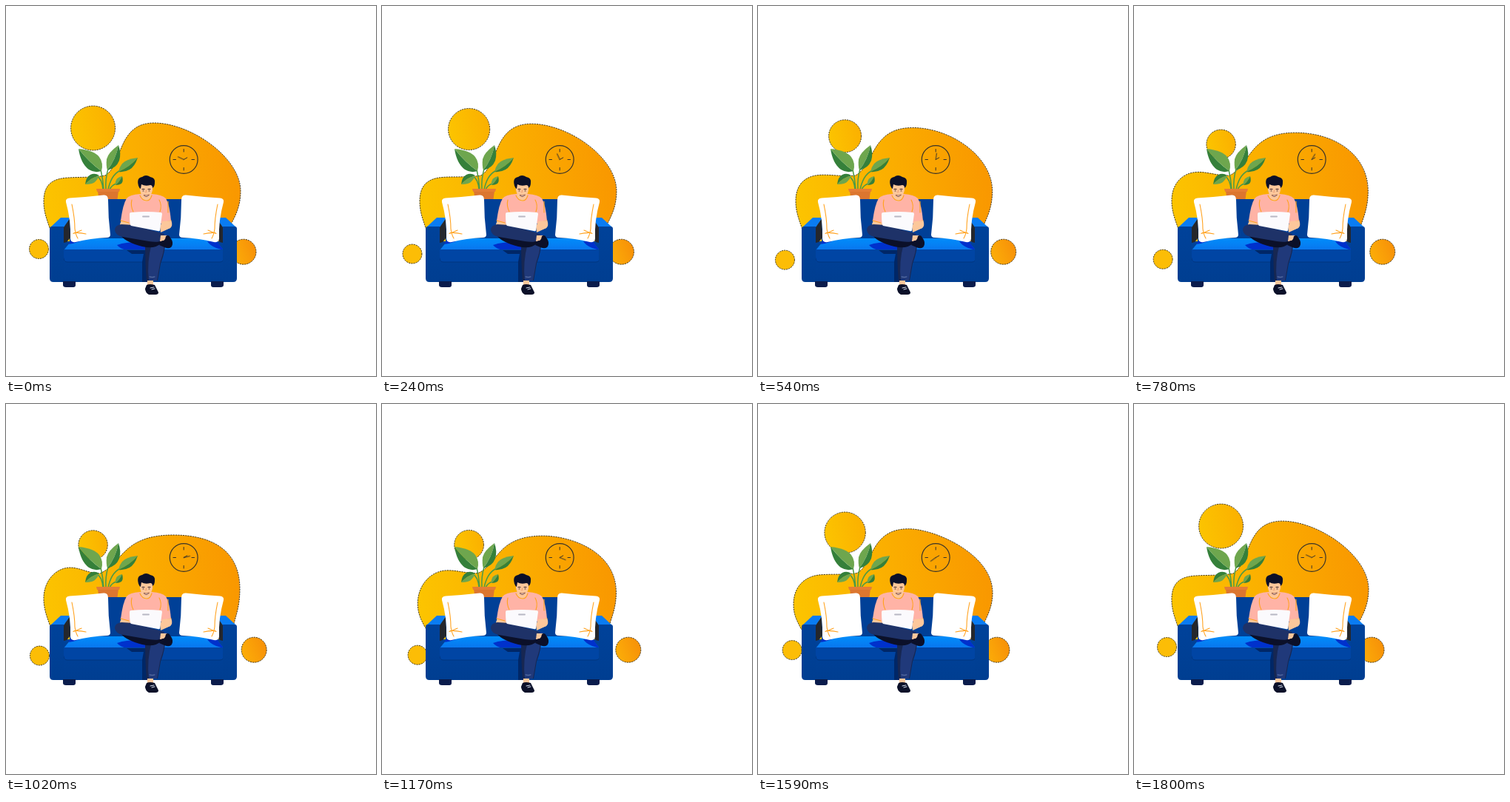
An HTML page that plays this animation: 500x500 px, repeating every 1830 ms.

```html
<!DOCTYPE html>
<html lang="en">
<head>
<meta charset="utf-8">
<title>Working from the sofa</title>
<style>
  html, body { margin: 0; width: 100%; height: 100%; overflow: hidden; background: #fff; }
  svg { display: block; width: 100vw; height: 100vh; }
  .rim { stroke: #1d180a; stroke-width: .8; stroke-dasharray: 2.2 1.1; }
  .line { fill: none; stroke-linecap: round; stroke-linejoin: round; }
  .clock { stroke: #37322a; stroke-width: 1.2; }
  .seam { stroke: #ffa21f; stroke-width: 1.1; }
  .stem { stroke: #4d9a45; stroke-width: 1.5; }
  .dark { fill: #35803a; }
  .light { fill: #6ea64e; }
  .skin { fill: #fcc79b; }
  .ink { fill: #0b1029; }

  .blob, .sun, .left-ball, .right-ball, .hand { animation: 1830ms infinite; }
  .blob { animation-name: morph; }
  .sun { animation-name: drop, shrink; animation-duration: 1830ms; }
  .left-ball { animation-name: orbit; }
  .right-ball { animation-name: slide; animation-timing-function: ease-in-out; }
  .hand { animation-name: turn; transform-origin: 240.2px 207.5px; }

  @keyframes morph {
    0%, 100% {
      d: path("M60 303C56 290 51 280 51 264C51 240 64 233 84 232C100 231 120 232 134 229C158 215 150 158 200 158C250 158 317 205 317 250C317 272 309 285 303 297V320H70Z");
      animation-timing-function: cubic-bezier(.5, 0, .75, .8);
    }
    55.7% {
      d: path("M59 298C55 287 51 276 51 263C51 238 68 221 87 221C100 221 112 229 127 229C158 215 157 177 226 177C282 177 316 200 316 250C316 272 311 285 308 297V320H70Z");
      animation-timing-function: linear;
    }
    73.8% {
      d: path("M56 304C49 295 45 290 45 278C45 250 66 231 86 229.5C104 228 118 230 133 228C155 220 152 179.5 207 179.5C225 179.5 317 199 317 260C317 273 313 283 309 293V320H70Z");
      animation-timing-function: ease-in-out;
    }
  }
  @keyframes drop {
    0%, 100% { cy: 165px; animation-timing-function: cubic-bezier(.6, 0, .5, 1); }
    59% { cy: 190.6px; animation-timing-function: cubic-bezier(.7, 0, .6, 1); }
  }
  @keyframes shrink {
    0%, 100% { r: 30px; animation-timing-function: ease-in-out; }
    44%, 60% { r: 19.7px; animation-timing-function: ease-in-out; }
  }
  @keyframes orbit {
    0%, 100% { cx: 44.5px; cy: 328.5px; animation-timing-function: cubic-bezier(.3, 0, .6, 1); }
    31% { cx: 36.4px; cy: 343.2px; animation-timing-function: cubic-bezier(.35, 0, .6, 1); }
    70% { cx: 48.7px; cy: 339px; animation-timing-function: ease-in-out; }
  }
  @keyframes slide {
    0%, 100% { cx: 321px; }
    47% { cx: 336px; }
  }
  @keyframes turn {
    0% { transform: rotate(-65deg); animation-timing-function: cubic-bezier(.2, .4, .7, .8); }
    40% { transform: rotate(25deg); animation-timing-function: cubic-bezier(.4, .2, .8, .8); }
    98.4%, 100% { transform: rotate(295deg); }
  }
</style>
</head>
<body>
<svg viewBox="0 0 500 500">
  <defs>
    <linearGradient id="blobFill" gradientUnits="userSpaceOnUse" x1="50" y1="270" x2="317" y2="235">
      <stop offset="0" stop-color="#fcc400"/><stop offset=".5" stop-color="#fbae00"/><stop offset="1" stop-color="#f99700"/>
    </linearGradient>
    <linearGradient id="sunFill" x1="0" y1=".6" x2="1" y2=".4">
      <stop offset="0" stop-color="#fcc400"/><stop offset="1" stop-color="#fbb000"/>
    </linearGradient>
    <linearGradient id="ballFill" x1="0" y1=".7" x2="1" y2=".3">
      <stop offset="0" stop-color="#fcae08"/><stop offset="1" stop-color="#f79008"/>
    </linearGradient>
    <linearGradient id="seatFill" x1="0" y1="0" x2="0" y2="1">
      <stop offset="0" stop-color="#008cfa"/><stop offset="1" stop-color="#0a76ee"/>
    </linearGradient>
    <linearGradient id="bodyFill" x1="0" y1="0" x2="0" y2="1">
      <stop offset="0" stop-color="#00429a"/><stop offset="1" stop-color="#003e91"/>
    </linearGradient>
    <g id="pillow">
      <path fill="#fff" d="M86 259.500 Q110 258 132 255.500 Q138 255 138 262 Q138 286 141 309 Q141 313 136 313 Q114 314 94 319 Q87 320 87 314 Q88 290 81 265 Q80 260 86 259.500Z"/>
      <path class="line seam" d="M89 268 Q93 287 93 301 Q94 309 97 314 M91 307.500 Q98 305 102 303 M92 306.500 Q100 306 108 308"/>
    </g>
    <g id="arm">
      <path fill="#25272c" d="M78 298 L86 287 L87 313 L82 319 L78 320Z"/>
      <path fill="#0a7cf2" d="M60 299 L74 286 H87 L78 299Z"/>
      <path fill="url(#bodyFill)" d="M59 301 Q59 298 62 298 H78 V373 H64 Q59 373 59 368Z"/>
      <path fill="#0a1c4c" d="M77 372 H94 V377 Q94 380 91 380 H81 Q77 380 77 377Z"/>
    </g>
  </defs>

  <path class="blob rim" fill="url(#blobFill)"/>
  <circle class="sun rim" cx="117.600" fill="url(#sunFill)"/>
  <circle class="left-ball rim" r="13" fill="#fcbd06"/>
  <circle class="right-ball rim" cy="332.200" r="17" fill="url(#ballFill)"/>

  <g class="line clock">
    <circle cx="240.200" cy="207.500" r="18.900"/>
    <path stroke-width="1" d="M240.200 193.500 V197 M240.200 218.500 V222 M226 207.500 H229.500 M251 207.500 H254.500 M240.200 207.500 L244.800 204.900"/>
    <path class="hand" stroke-width="1" d="M240.200 207.500 V199"/>
  </g>

  <g id="plant">
    <path class="line stem" d="M128 221 Q131 234 132 248 M138 220 Q134 234 135 248 M153 223 Q142 229 138 248 M123 230 Q130 234 131 248 M149 240 Q143 242 140 248"/>
    <path class="dark" d="M98 193 Q101 213 112 221 Q120 226 129 223 Q113 212 98 193Z"/>
    <path class="light" d="M98 193 Q119 195 126 204 Q132 212 129 223 Q113 212 98 193Z"/>
    <path class="light" d="M152 188 Q138 198 136 207 Q135 216 137 222 Q149 206 152 188Z"/>
    <path class="dark" d="M152 188 Q156 199 153 209 Q149 219 137 222 Q149 206 152 188Z"/>
    <path class="light" d="M178 205 Q162 207 157 213 Q153 218 152 224 Q168 217 178 205Z"/>
    <path class="dark" d="M178 205 Q174 217 167 221 Q160 225 152 224 Q168 217 178 205Z"/>
    <path class="dark" d="M107 241 Q108 231 114 228 Q120 225 126 229 Q115 232 107 241Z"/>
    <path class="light" d="M107 241 Q118 241 121 237 Q124 234 126 229 Q115 232 107 241Z"/>
    <path class="light" d="M157 230 Q150 232 149 235 Q147 238 148 242 Q154 237 157 230Z"/>
    <path class="dark" d="M157 230 Q159 237 156 240 Q153 242 148 242 Q154 237 157 230Z"/>
    <path fill="#dc762f" d="M124 250 H152 L150 265 H126Z"/>
    <path fill="#e47d36" d="M122 247 H154 L153 251 H123Z"/>
  </g>

  <g id="sofa">
    <path fill="#004097" d="M86 265 Q86 261 90 261 H282 Q286 261 286 265 V322 H86Z"/>
    <path fill="url(#bodyFill)" d="M72 318 H299 V373 H72Z"/>
    <path fill="url(#seatFill)" d="M78 330 L91 314 H281 L294 330Z"/>
    <path fill="#0031cc" d="M84 322 L88 317 L100 318 Q92 321 84 322Z M272 318 L285 318 L294 330 L284 327 Q276 324 272 318Z M150 323 Q164 318 196 319 L194 330 H163 Q154 328 150 323Z"/>
    <path fill="#0045a4" d="M77 329 H294.500 V341 Q294 346 289 346 H82 Q77 346 77 341Z"/>
    <path class="line" stroke="#00357f" stroke-width="1" d="M78 341 Q78 346 83 346 H289 Q294 346 294 341"/>
    <path fill="#002767" d="M163 330 H195 V373 H184 V346 L186 335 H170Z"/>
    <use href="#arm"/>
    <use href="#arm" transform="matrix(-1 0 0 1 371 0)"/>
    <use href="#pillow"/>
    <use href="#pillow" transform="matrix(-1 0 0 1 375 0)"/>
  </g>

  <g id="man">
    <path class="skin" d="M156 289 L169 290 L168 304 Q157 301 154 295Z M212 289 H223 Q226 297 222 300 L209 306 L208 298Z"/>
    <path fill="#ffb3a6" d="M181 254 Q167 255 163 260 Q158 268 155 290 L168 294 H209 L223 290 Q221 268 216 260 Q211 255 197 254Z"/>
    <path class="line seam" d="M170 262 Q168 270 172 278 M207 262 Q211 269 208 278 M155 290 L166 293 M212 293 L223 290 M219 264 V279"/>
    <path class="skin" d="M183 251 H196 V257 Q194 264 189 264 Q184 263 182 257Z"/>
    <path class="line seam" d="M181 256 Q184 263 190 263 Q195 263 197 256"/>
    <path class="skin" d="M181 239 H198 V249 Q196 259 189.500 259 Q183 258 181 249Z"/>
    <path class="ink" d="M179 243 Q176 232 184 231 Q189 227 195 231 Q202 232 201 239 Q201 244 198 246 Q198 242 195 242 Q188 244 183 241 L182 247 Q180 246 179 243Z"/>
    <path class="line" stroke="#30202b" stroke-width="1" d="M184 247.500 H187 M192 247.500 H195 M185 249.800 H186 M193 249.800 H194"/>
    <path class="line" stroke="#e58c62" stroke-width=".8" d="M189.500 249 L189 252"/>
    <path fill="#fff" stroke="#7b3d30" stroke-width=".8" d="M186 255.500 Q190 257 193.500 255 Q190 260 186 255.500Z"/>

    <path fill="#172752" d="M188 316 L216 315 Q215 333 209 348 L205 371 L190 371 Q188 352 188 316Z"/>
    <path fill="#20397a" d="M197 321 L215 319 Q213 334 208 348 L204 371 H193 Q190 346 197 321Z"/>
    <path class="line" stroke="#7a8fbd" stroke-width=".8" d="M194 366 Q198 367 201 366"/>
    <path class="ink" d="M156 311 Q162 319 184 325 Q201 329 209 321 L213 311Z"/>
    <path fill="#1e3268" d="M156 295 Q147 296 147 303 Q148 310 158 312 L193 318 Q206 320 210 317 L214 308 L172 296Z"/>
    <path class="skin" d="M209 310 L218 310 L216 317 L208 318Z M191 371 H199 V379 H191Z"/>
    <path class="ink" d="M216 311 Q220 308 222 313 Q227 319 224 325 Q221 329 214 326 L207 323 L211 317 Q215 318 216 311Z"/>
    <path class="ink" d="M190 377 Q194 375 201 377 L206 387 Q206 390 202 390 H193 Q188 387 188 382Z"/>
    <path class="line" stroke="#dce5f5" stroke-width="1" d="M195 381 L200 380 M197 383 L201 382"/>
    <path fill="#fbfafd" d="M169 279 Q189 277 209 279 Q211 279 211 281 L208 303 Q208 305 205 304 L169 297 Q167 296 167 281 Q167 279 169 279Z"/>
    <path class="line" stroke="#b8b8c4" stroke-width="1.800" d="M185 284.500 H193"/>
    <path class="skin" d="M211 291 L223 290 Q225 297 222 300 L209 305Z"/>
  </g>
</svg>
</body>
</html>
```
